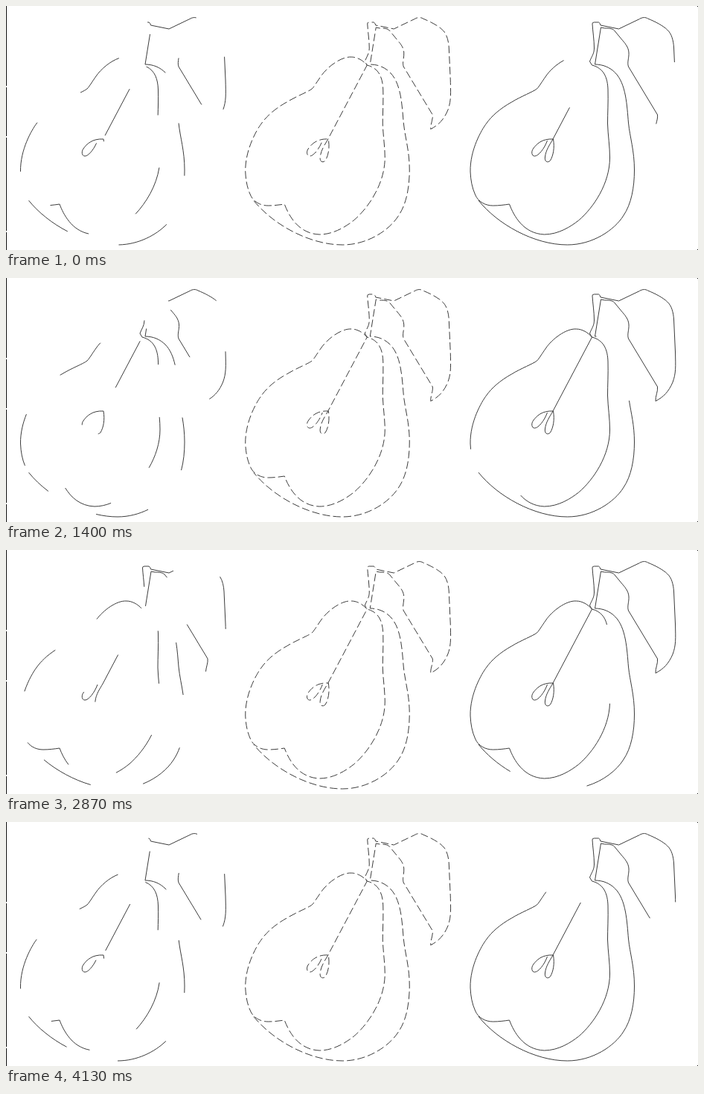
An HTML page for the animation above (4200 ms loop, 930x330 px).

```html
<!DOCTYPE html>
<html lang="en">
<head>
<meta charset="utf-8">
<title>Dashed pears</title>
<style>
  html, body { margin: 0; width: 100%; height: 100%; overflow: hidden; background: #fff; }
  svg { display: block; width: 930px; height: 330px; }

  path {
    fill: none;
    stroke: #3c3c3c;
    stroke-width: 1;
    animation: march 2100ms linear -1666ms infinite;
  }

  .half { --base: 0; --cycle: 140; }
  .half path { stroke-dasharray: 70 70; animation-timing-function: ease; }
  .fine { --base: 0; --cycle: 14; }
  .fine path { stroke-dasharray: 10 4; }
  .long { --base: 849; --cycle: 945; }
  .long path { stroke-dasharray: 840 105; }

  /* --start is the distance already covered by the earlier sections */
  @keyframes march {
    from { stroke-dashoffset: calc((var(--start) + var(--base)) * 1px); }
    to { stroke-dashoffset: calc((var(--start) + var(--base) + var(--cycle)) * 1px); }
  }
</style>
</head>
<body>
<svg id="stage" viewBox="0 0 930 330"></svg>
<script>
  // One continuous outline, cut at its corners; each section has its length.
  const sections = [
    { // seeds and core line
      length: 249.5,
      d: `M123 182 C119 193 111 203 106 203 C102 203 101 197 104 193
          C108 187 116 179 131 180 C133 192 131 202 127 209
          C123 213 119 210 120 204 C121 195 126 188 130 181 L183 80`
    },
    { // cut face
      length: 670,
      d: `M183 80 C178 74 170 69 162 69 C148 68 129 83 121 95
          C116 102 112 109 109 112 C104 116 88 122 75 130
          C59 139 48 149 41 159 C35 167 19 194 19.5 224
          C20 236 22 246 26 255 C30 265 40 270 50 270
          C58 270 65 269 72 268 C78 284 91 308 119 309
          C138 309 155 298 165 290 C185 273 207 240 207 205
          C207 190 204.5 175 204 159 C204 145 205 130 204.5 113
          C204 97 199 84 183 80`
    },
    { // stem and leaf
      length: 524.5,
      d: `M183 80 L180 75 C182 69 186 65 186 57 C186 46 184 34 183.5 24
          Q183.5 22 186 22 L192 22 Q194 23 194.5 26 L219 31 L247 17.5
          C251 15 255 15 258 17 C268 21 279 27 284 32
          C290 37 292.5 47 293 56 L295 100 C295.5 120 296 129 291.5 141
          C286 154 279 161 268.5 166.5 C268 160 272 153 271 147 L232 82
          C230 76 233 70 232.5 63 C232 55 227 50 222 44 L213 33
          C210 30 204 30 200 30 L195 29 L187 79`
    },
    { // back half
      length: 445.5,
      d: `M187 79 C198 79 207 83 214 90 C229 105 230 135 232 158
          C234 178 240 195 240 222 C240 245 236 268 225 284
          C213 303 184 323 150 323 C105 323 56 295 30.5 263`
    }
  ];

  let start = 0;
  const outline = sections.map(({ length, d }) => {
    const path = `<path d="${d}" pathLength="${length}" style="--start:${start}"/>`;
    start += length;
    return path;
  }).join('');

  const pears = ['half', 'fine', 'long'].map((name, i) =>
    `<g class="${name}" transform="translate(${302.25 * i} 0)">${outline}</g>`).join('');

  const edge = '<rect width="1" height="330" fill="#111"/>' +
    [108, 176, 304].map(y => `<rect y="${y}" width="1" height="2" fill="#fff"/>`).join('') +
    [0, 329].map(y => `<rect x="929" y="${y}" width="1" height="1" fill="#111"/>`).join('');

  document.getElementById('stage').innerHTML = edge + pears;
</script>
</body>
</html>
```
